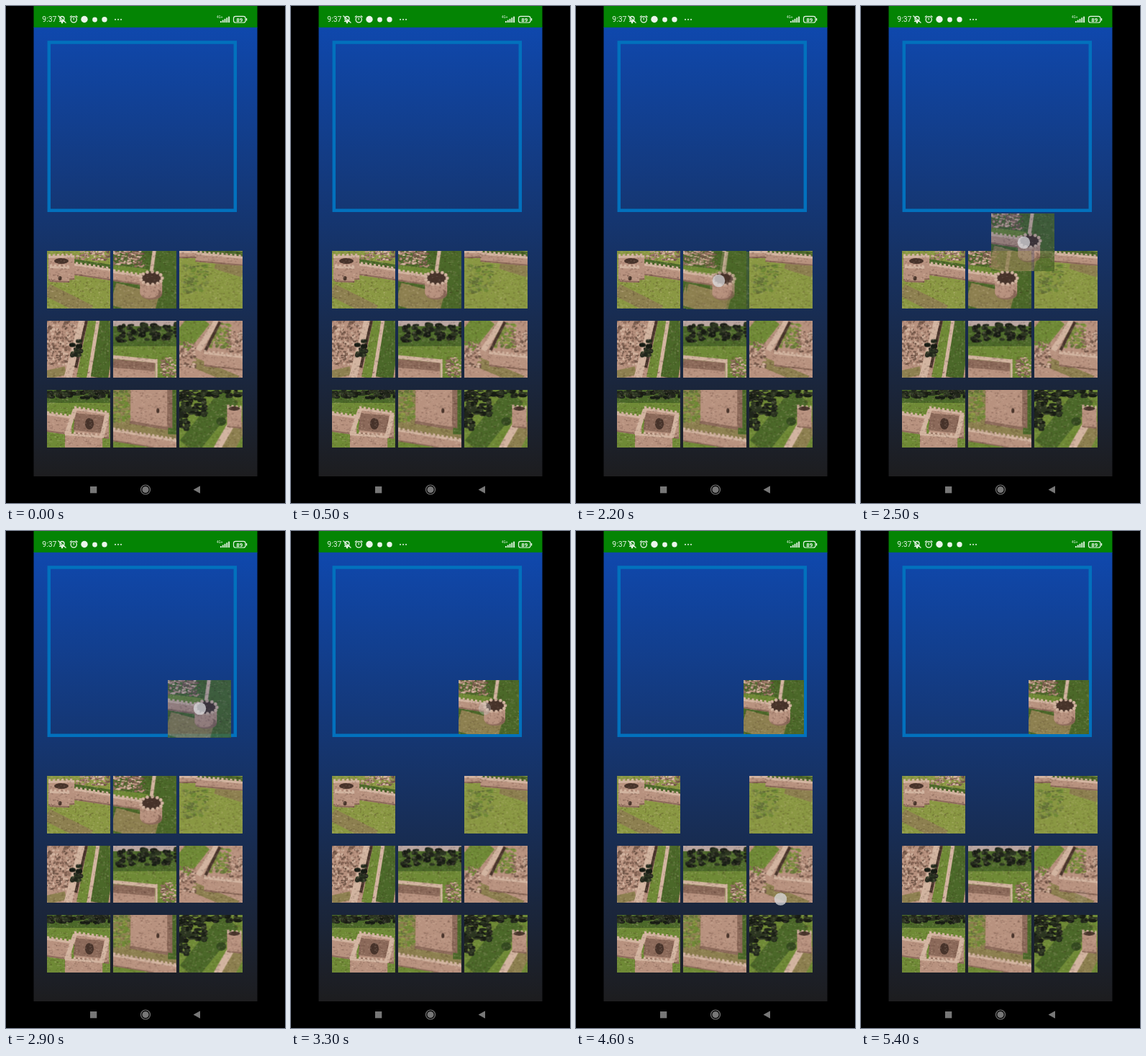
These frames come from a looping animation (388x690 px, 5900 ms). An HTML page with a canvas:

```html
<!DOCTYPE html>
<html lang="en">
<head>
<meta charset="utf-8">
<title>Tile puzzle</title>
<style>
  html, body { margin: 0; width: 100%; height: 100%; overflow: hidden; background: #000; }
  canvas { display: block; }
</style>
</head>
<body>
<canvas id="stage" width="388" height="690"></canvas>
<script>
const stage = document.getElementById('stage').getContext('2d');
const LOOP = 5900, STEP = 100, W = 88, H = 79.5;
const STONE = '#b8927f', PALE = '#d2b4a0', SHADE = '#8c6a5a', DARK = '#48342b',
      GRASS = '#6f8a36', LIME = '#8a9843', DEEP = '#4b6829', OLIVE = '#8d8050', TREE = '#20261b';
const INK = '#eaf5ea';
let ctx = stage;

function randomizer(seed) {
  return () => (seed = (seed * 16807) % 2147483647) / 2147483647;
}

function rect(color, x, y, w, h) {
  ctx.fillStyle = color;
  ctx.fillRect(x, y, w, h);
}

function disc(color, x, y, rx, ry = rx) {
  ctx.fillStyle = color;
  ctx.beginPath();
  ctx.ellipse(x, y, rx, ry, 0, 0, 7);
  ctx.fill();
}

function ring(color, width, x, y, r) {
  ctx.strokeStyle = color;
  ctx.lineWidth = width;
  ctx.beginPath();
  ctx.arc(x, y, r, 0, 7);
  ctx.stroke();
}

function strip(color, width, x0, y0, x1, y1) {
  ctx.strokeStyle = color;
  ctx.lineWidth = width;
  ctx.beginPath();
  ctx.moveTo(x0, y0);
  ctx.lineTo(x1, y1);
  ctx.stroke();
}

// Upright wall of height h below a sloping, crenellated top edge.
function wall(x0, y0, x1, y1, h) {
  const slope = (y1 - y0) / (x1 - x0);
  for (let x = x0; x < x1; x++) {
    const y = y0 + (x - x0) * slope;
    rect(STONE, x, y, 1.2, h);
    rect(PALE, x, y, 1.2, 3);
    rect(SHADE, x, y + h - 2, 1.2, 2);
    if ((x - x0) % 6 < 3) rect(PALE, x, y - 2.5, 1.2, 3);
  }
}

// Blobs spread over a rectangle, as many as its area needs.
function scatter(colors, size, x, y, w, h) {
  const rnd = randomizer(Math.round(x * 31 + y * 17 + w) + 99);
  for (let i = 0; i < w * h / size / 4; i++) {
    disc(colors[i % colors.length], x + rnd() * w, y + rnd() * h, size * (.5 + rnd()), size * (.4 + rnd() * .6));
  }
}
const stones = (...box) => scatter([SHADE, PALE, STONE, '#74594b'], 1.8, ...box);
const leaves = (...box) => scatter([TREE, '#2d3722', '#171c14'], 3.6, ...box);
const bushes = (...box) => scatter([GRASS, LIME, '#7c8a44', '#66743a'], 2.4, ...box);

const scenes = [
  [LIME, () => {
    strip(OLIVE, 18, 0, 54, 60, 84);
    stones(40, 0, 48, 13);
    strip(DEEP, 6, 36, 14, 88, 22);
    wall(34, 17, 88, 25, 16);
    wall(2, 7, 38, 6, 34);
    disc(DARK, 20, 14, 10, 4);
    wall(4, 21, 31, 22, 22);
    disc(DARK, 18, 38, 2.5, 3);
  }],
  [DEEP, () => {
    stones(0, 0, 43, 22);
    strip(GRASS, 9, 0, 24, 48, 30);
    strip(PALE, 5, 57, 0, 53, 28);
    strip(OLIVE, 32, 0, 60, 60, 76);
    wall(0, 28, 40, 34, 14);
    rect(STONE, 37, 38, 31, 22);
    disc(SHADE, 53, 60, 15, 8);
    disc(STONE, 50, 58, 13, 8);
    disc(DARK, 53, 38, 15, 9);
    for (let a = 0; a < 6.2; a += .48) disc(PALE, 53 + 15 * Math.cos(a), 38 + 9 * Math.sin(a), 2.4);
  }],
  [LIME, () => {
    strip(DEEP, 10, 20, 2, 88, 6);
    strip(OLIVE, 14, 50, 18, 88, 30);
    wall(22, 2, 88, 8, 13);
    wall(-2, 0, 23, 0, 10);
    bushes(6, 20, 32, 40);
  }],
  [STONE, () => {
    stones(0, 0, 42, 62);
    strip(OLIVE, 12, 0, 76, 26, 70);
    strip(GRASS, 14, 64, 0, 48, 80);
    strip(PALE, 11, 50, 0, 29, 80);
    strip(DARK, 4, 55, 0, 40, 66);
    strip(DEEP, 26, 85, 0, 72, 80);
    strip(PALE, 5, 71, 0, 58, 80);
    leaves(35, 28, 12, 22);
  }],
  [GRASS, () => {
    rect('#b9a5a0', 0, 0, W, 8);
    rect(DEEP, 0, 8, W, 28);
    for (let x = 6; x < W; x += 16) leaves(x, 5, 9, 24);
    rect(STONE, 0, 62, 58, 18);
    strip(SHADE, 12, 0, 60, 58, 65);
    strip(PALE, 5, 0, 51, 60, 57);
    stones(66, 52, 22, 28);
    strip(PALE, 3, 60, 54, 60, 80);
  }],
  [STONE, () => {
    strip(GRASS, 30, 30, -4, 0, 34);
    bushes(42, 4, 28, 34);
    stones(66, 12, 22, 32);
    strip(PALE, 8, 52, 0, 26, 42);
    strip(DARK, 4, 56, 2, 36, 42);
    strip(OLIVE, 14, 18, 58, 80, 84);
    wall(34, 44, 88, 50, 20);
    stones(0, 30, 22, 36);
  }],
  [GRASS, () => {
    rect(DEEP, 0, 0, W, 18);
    leaves(0, 0, W, 11);
    wall(0, 32, 34, 37, 26);
    wall(38, 25, 86, 32, 36);
    strip(SHADE, 24, 38, 44, 78, 48);
    disc(DARK, 59, 47, 6, 8);
    strip(PALE, 6, 39, 27, 27, 62);
    strip(PALE, 6, 84, 34, 76, 66);
    wall(25, 60, 77, 64, 24);
  }],
  [OLIVE, () => {
    bushes(0, 0, 22, 46);
    strip(DEEP, 12, 84, 0, 82, 62);
    for (let x = 24; x < 82; x++) rect(x > 74 ? SHADE : STONE, x, 0, 1.2, 40 + x / 6);
    strip(SHADE, 4, 23, 45, 76, 54);
    disc(DARK, 62, 29, 2, 3.5);
    wall(0, 55, 88, 70, 17);
    strip(GRASS, 8, 0, 76, 50, 84);
  }],
  [GRASS, () => {
    strip(DEEP, 30, 12, 80, 70, 8);
    leaves(0, 0, 36, 36);
    leaves(40, 0, 48, 9);
    leaves(0, 36, 12, 18);
    disc('#33491f', 58, 44, 7, 6);
    strip(OLIVE, 22, 86, 44, 64, 84);
    strip(PALE, 10, 74, 44, 52, 82);
    wall(66, 23, 86, 25, 29);
    disc(DARK, 76, 26, 8, 3);
  }]
];

// Paint each scene once, with a fine photographic grain.
const tiles = scenes.map(([ground, paint], k) => {
  const canvas = document.createElement('canvas'), rnd = randomizer(k + 91);
  canvas.width = W;
  canvas.height = 80;
  ctx = canvas.getContext('2d');
  rect(ground, 0, 0, W, 80);
  paint();
  for (let i = 0; i < 700; i++) {
    rect(i % 2 ? 'rgba(50,30,20,.16)' : 'rgba(255,225,200,.12)', rnd() * W, rnd() * 80, 1 + rnd() * 2, 1 + rnd());
  }
  return canvas;
});
ctx = stage;

function text(s, x, y, font) {
  ctx.font = `${font} Roboto, sans-serif`;
  ctx.fillStyle = INK;
  ctx.fillText(s, x, y);
}

function statusBar() {
  rect('#048404', 38.5, 0, 311, 29.7);
  text('9:37', 50.3, 22, '10.4px');
  // Muted bell
  ring(INK, 1.3, 78, 17.5, 3);
  strip(INK, 1.3, 74, 21.3, 82, 21.3);
  disc(INK, 78, 23, 1.3);
  strip(INK, 1.2, 72.5, 13.5, 83.5, 23.5);
  // Alarm clock
  ring(INK, 1.3, 94.2, 18.8, 4.1);
  strip(INK, 1.1, 94.2, 16.3, 94.2, 19.5);
  strip(INK, 1.3, 89, 15.5, 91.5, 13.4);
  strip(INK, 1.3, 97, 13.4, 99.5, 15.5);
  // App badges and overflow dots
  disc(INK, 109, 18.5, 4.7);
  disc(INK, 123.5, 19, 3.4);
  disc(INK, 137, 18.7, 3.7);
  for (let i = 0; i < 3; i++) disc(INK, 152 + i * 4, 18.7, 1);
  // Signal and battery
  text('4G+', 293, 17, '4.6px');
  for (let i = 0; i < 5; i++) rect(INK, 298 + i * 2.8, 21 - i * 1.6, 1.8, 2 + i * 1.6);
  ctx.strokeStyle = INK;
  ctx.lineWidth = 1.2;
  ctx.beginPath();
  ctx.roundRect(316.5, 14.3, 16.5, 8.7, 2.8);
  ctx.stroke();
  rect(INK, 333.8, 17, 1.4, 3.4);
  text('89', 320.2, 21.8, 'bold 8px');
}

function navBar() {
  const grey = '#777';
  rect(grey, 117, 667, 9.3, 9.3);
  ring(grey, 1.2, 194, 671.5, 6.5);
  disc(grey, 194, 671.5, 4.6);
  for (let x = 0; x < 10; x++) rect(grey, 260 + x, 671.5 - x * .55, 1, x * 1.1);
}

const sky = stage.createLinearGradient(0, 29, 0, 653);
sky.addColorStop(0, '#0f48ad');
sky.addColorStop(1, '#1d1d1f');

const ramp = (t, a, b) => Math.min(1, Math.max(0, (t - a) / (b - a)));
const ease = k => k * k * (3 - 2 * k);

function touch(x, y, alpha) {
  ctx.globalAlpha = alpha;
  disc('#d9d9dc', x, y, 8.7);
  ctx.globalAlpha = 1;
}

function draw(t) {
  const placed = t >= 3100;
  rect('#000', 0, 0, 388, 690);
  rect(sky, 38.5, 29, 311, 624);
  statusBar();
  navBar();

  ctx.strokeStyle = '#0271bd';
  ctx.lineWidth = 4.5;
  ctx.strokeRect(59.8, 50.5, 259, 233.3);

  tiles.forEach((tile, i) => {
    if (i === 1 && placed) return;
    ctx.drawImage(tile, 57 + 92.2 * (i % 3), 340 + 96.5 * Math.floor(i / 3), W, H);
  });

  const drag = ease(ramp(t, 2200, 2900));
  if (placed) {
    ctx.drawImage(tiles[1], 233, 207, 84, 74.5);
  } else if (t >= 2000) {
    ctx.globalAlpha = .76;
    ctx.drawImage(tiles[1], 152.5 + 72.8 * drag, 341 - 134 * drag, W, H);
    ctx.globalAlpha = 1;
  }

  if (t >= 1300 && t < 3500) touch(198.5 + 71 * drag, 381.5 - 135 * drag, .75 * (1 - ramp(t, 3000, 3500)));
  if (t >= 4500) {
    const slide = ramp(t, 4600, 5000);
    touch(284.5 + 22 * slide, 511 - 3 * slide, .76 - .68 * ramp(t, 4900, 5200));
  }
}

function frame(now) {
  draw(Math.floor(now % LOOP / STEP) * STEP);
  requestAnimationFrame(frame);
}
requestAnimationFrame(frame);
</script>
</body>
</html>
```
